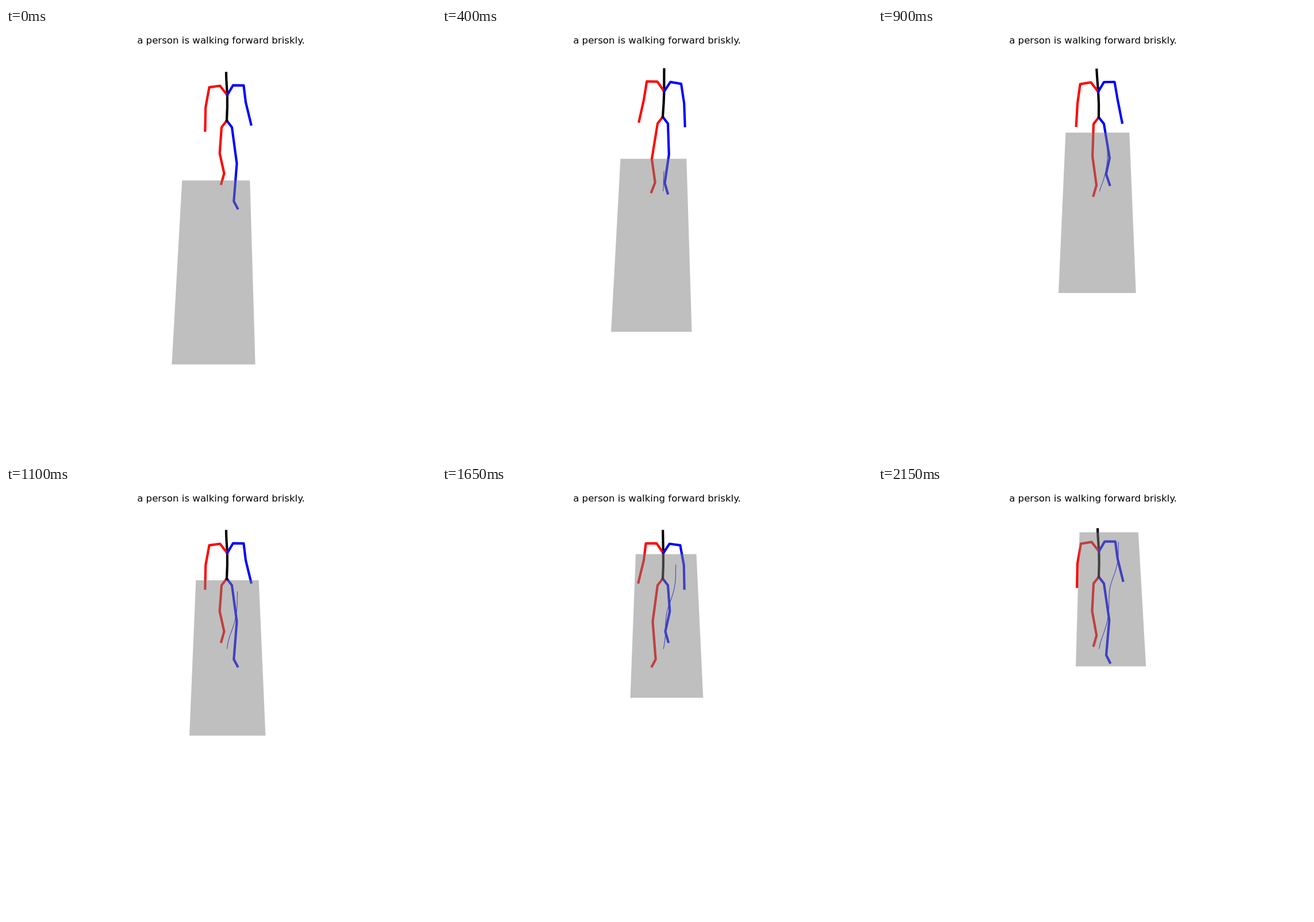
An HTML page with a canvas that plays this animation: 748x748 px, repeating every 2.2 s.

```html
<!DOCTYPE html>
<html lang="en">
<head>
<meta charset="utf-8">
<title>Walking figure</title>
<style>
  html, body { margin: 0; width: 100%; height: 100%; overflow: hidden; background: #fff; }
  canvas { display: block; width: 748px; height: 748px; }
</style>
</head>
<body>
<canvas id="stage" width="748" height="748"></canvas>
<script>
const ctx = document.getElementById('stage').getContext('2d');
const LOOP = 2200, STEP = 50, CYCLE = 1100;
const MID = 384, HORIZON = -1120, ROOT_DEPTH = 710;
const FLOOR_LEN = 135.5, FLOOR_HALF = 426;
const { cos, sin, PI } = Math;

const angle = t => t / CYCLE * 2 * PI;

// The body rises and falls once per step, two steps per cycle
const bob = a => 5.4 * cos(2 * a - 1.37);
const hipHeight = a => 160 + bob(a);

// The floor recedes steadily, with a sideways sway from the walk
const floorDepth = t => 721.8 + 0.0518 * t + 0.08 * bob(angle(t));
const floorShift = t => -151.5 + 0.13 * t + 20.5 * cos(angle(t) + 0.63);

// Periodic motion: mean, then cosine and sine of the cycle and of its double
const wave = (mean, c = 0, s = 0, c2 = 0, s2 = 0) => a =>
  mean + c * cos(a) + s * sin(a) + c2 * cos(2 * a) + s2 * sin(2 * a);

// Each joint is [outward, down] from the root
const LEG = [
  [wave(9), wave(11.6)],
  [wave(14.9, 2.6, -3.2), wave(67, 8.9, 2.5, -1.1, -2.3)],
  [wave(8.4, 3.9, -3.1), wave(108, 24.2, 21.8, 8.2, -7.9)],
  [wave(14.2, 4.6, -3.3), wave(125.2, 21.3, 20, 6, -7.6)]
];
const ARM = [
  [wave(11.3, -0.4, 2.3), wave(-61, -0.4)],
  [wave(29.9, -0.5, 2.4), wave(-59.6, -1.6, 1.4)],
  [wave(34.9, -1.9, 1.4), wave(-27.5, -4.3, 1.4)],
  [wave(40, 2.4, 0.3), wave(12, -5.3, 0.6)]
];
const SPINE = [
  [wave(0), wave(0)],
  [wave(0.9, 0, 0.9), wave(-23)],
  [wave(0.9, 0, 2), wave(-44.3)],
  [wave(-0.2, -0.6, 2.9), wave(-73)],
  [wave(-0.4, -0.6, 3.3), wave(-82.6)]
];

// side is 1 or -1; the far side runs half a cycle later, mirrored
function pose(chain, t, side = 1) {
  const body = angle(t), a = side > 0 ? body : body + PI;
  return chain.map(([x, y]) => [MID + side * x(a), hipHeight(body) + y(a)]);
}

// Perspective of a point on the floor
function project(x, depth) {
  const scale = 1e6 / depth;
  return [MID + x * scale * 1e-4, HORIZON + scale];
}

function trace(points) {
  ctx.beginPath();
  points.forEach(p => ctx.lineTo(p[0], p[1]));
}

function stroke(points, color, width = 4.16) {
  trace(points);
  ctx.strokeStyle = color;
  ctx.lineWidth = width;
  ctx.stroke();
}

function drawTrail(t) {
  const points = [];
  for (let u = 0; u < t; u += STEP) {
    points.push(project(floorShift(t) - floorShift(u), ROOT_DEPTH + floorDepth(t) - floorDepth(u)));
  }
  if (points.length > 1) stroke(points, '#00f', 1.04);
}

function drawBody(t) {
  const spine = pose(SPINE, t), root = spine[0], chest = spine[2];
  stroke([root, ...pose(LEG, t, -1)], '#f00');
  stroke([root, ...pose(LEG, t)], '#00f');
  stroke(spine, '#000');
  stroke([chest, ...pose(ARM, t, -1)], '#f00');
  stroke([chest, ...pose(ARM, t)], '#00f');
}

function drawFloor(t) {
  const left = floorShift(t) - FLOOR_HALF, right = floorShift(t) + FLOOR_HALF;
  const far = floorDepth(t), near = far - FLOOR_LEN;
  trace([project(left, far), project(right, far), project(right, near), project(left, near)]);
  ctx.fillStyle = 'rgba(128,128,128,0.5)';
  ctx.fill();
}

function draw(t) {
  ctx.fillStyle = '#fff';
  ctx.fillRect(0, 0, 748, 748);
  ctx.lineCap = 'square';
  ctx.lineJoin = 'round';
  drawTrail(t);
  drawBody(t);
  drawFloor(t);
  ctx.fillStyle = '#000';
  ctx.font = '16.62px "DejaVu Sans", sans-serif';
  ctx.textAlign = 'center';
  ctx.fillText('a person is walking forward briskly.', 374, 27);
}

const start = performance.now();
function tick() {
  const t = (performance.now() - start) % LOOP;
  draw(Math.floor(t / STEP) * STEP);
  requestAnimationFrame(tick);
}
tick();
</script>
</body>
</html>
```
